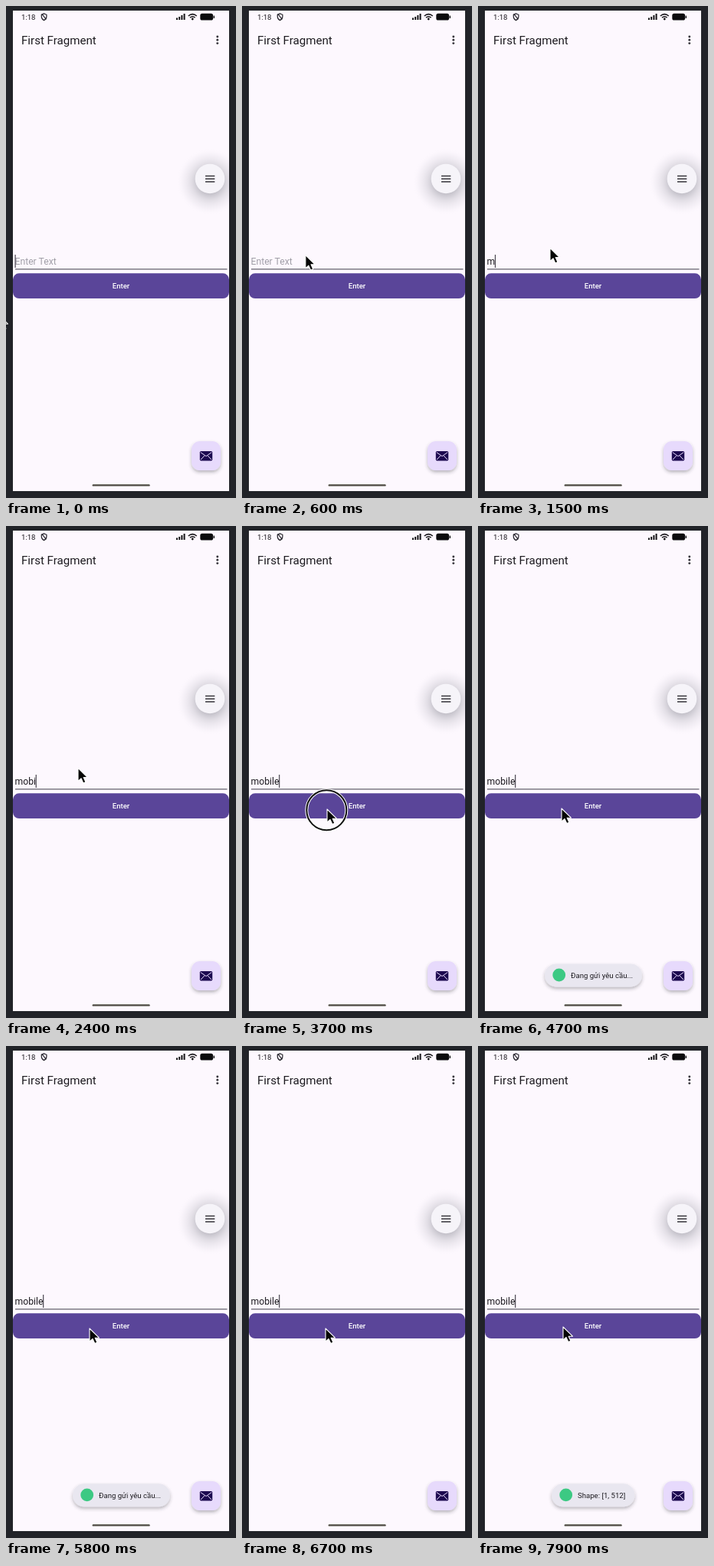
Write an HTML page that moves like this. It is 300 px wide and 641 px high and loops after 8000 ms.

```html
<!DOCTYPE html>
<html lang="en">
<head>
<meta charset="utf-8">
<title>First Fragment</title>
<style>
  html, body { margin: 0; width: 100%; height: 100%; overflow: hidden; background: #212328; }
  svg { display: block; width: 100vw; height: 100vh; }
  text { font-family: Roboto, sans-serif; fill: #1d1b20; }
</style>
</head>
<body>
<svg viewBox="0 0 300 641" preserveAspectRatio="none">
  <defs>
    <radialGradient id="glow">
      <stop offset=".35" stop-color="#b9b7c0" stop-opacity=".85"/>
      <stop offset=".55" stop-color="#d3d0d8" stop-opacity=".65"/>
      <stop offset=".8" stop-color="#e8e4ec" stop-opacity=".35"/>
      <stop offset="1" stop-color="#fdf8fe" stop-opacity="0"/>
    </radialGradient>
    <filter id="soft" x="-40%" y="-40%" width="180%" height="190%">
      <feDropShadow dx="0" dy="2.5" stdDeviation="2.3" flood-color="#34323c" flood-opacity=".34"/>
    </filter>
    <clipPath id="screen"><rect x="9" y="6" width="282" height="626"/></clipPath>
  </defs>

  <rect width="300" height="641" fill="#212328"/>
  <g clip-path="url(#screen)">
    <rect x="9" y="6" width="282" height="626" fill="#fdf8fe"/>

    <!-- status bar -->
    <text x="20" y="17.5" font-size="9.6">1:18</text>
    <g fill="none" stroke="#24222a" stroke-width="1.2">
      <path d="M46.3 11.3 L49.5 10 L52.9 11.3 V14 Q52.8 17 49.5 18.6 Q46.4 17 46.3 14 Z"/>
      <path d="M46.8 10.4 L52.4 17.4"/>
    </g>
    <path d="M222 18v-2.5h2v2.5z M225.2 18v-4h2v4z M228.4 18v-6h2v6z M231.6 18v-8h2v8z" fill="#151417"/>
    <g fill="none" stroke="#151417" stroke-width="1.5">
      <path d="M237.8 13 Q243.3 8.3 248.8 13"/>
      <path d="M240 15.2 Q243.3 12.5 246.6 15.2"/>
    </g>
    <circle cx="243.3" cy="17" r="1.4" fill="#151417"/>
    <rect x="253.3" y="9.8" width="16.8" height="8.8" rx="2.6" fill="#0c0c0e"/>
    <rect x="270.6" y="12.4" width="1.4" height="3.6" rx=".6" fill="#0c0c0e"/>

    <!-- app bar -->
    <text x="20" y="50.3" font-size="15.1">First Fragment</text>
    <g fill="#36343b">
      <circle cx="275.8" cy="40" r="1.45"/>
      <circle cx="275.8" cy="44.3" r="1.45"/>
      <circle cx="275.8" cy="48.6" r="1.45"/>
    </g>

    <!-- floating menu -->
    <circle cx="266" cy="229" r="44" fill="url(#glow)"/>
    <circle cx="266" cy="225" r="19.3" fill="#f6f4f9"/>
    <path d="M260 221.5h12.3 M260 225.3h12.3 M260 229.1h12.3" stroke="#36343b" stroke-width="1.5"/>

    <!-- input and button -->
    <text id="field" x="11.5" y="337.4" font-size="12.2"></text>
    <rect id="caret" y="324" width="1.2" height="17" fill="#49454f"/>
    <path d="M12 342.8H288.5" stroke="#65626d" stroke-width="1.3"/>
    <rect x="9" y="348.3" width="282" height="32.7" rx="8" fill="#5a4599"/>
    <text x="150" y="368.4" font-size="9.6" font-weight="500" text-anchor="middle" style="fill:#fff">Enter</text>

    <!-- mail button -->
    <rect x="242" y="567" width="38" height="38" rx="11" fill="#e7dafc" filter="url(#soft)"/>
    <rect x="252.8" y="580" width="16.4" height="12.4" rx="1.6" fill="#1d0a50"/>
    <path d="M253.8 581.5 L261 586.6 L268.2 581.5 M254 591 L258.8 586 M268 591 L263.2 586" fill="none" stroke="#e7dafc" stroke-width="1"/>

    <path d="M113.8 624.4H186.5" stroke="#4c4a40" stroke-width="2.4" stroke-linecap="round"/>

    <g id="toasts"></g>
  </g>

  <g id="ring" fill="none">
    <circle r="26" stroke="#fff" stroke-width="4"/>
    <circle r="26" stroke="#111" stroke-width="2"/>
  </g>
  <path id="pointer" d="M0 0 V17.2 L4 13.5 L6.8 19.6 L9.9 18.2 L7.2 12.2 H12.4 Z" fill="#060606" stroke="#fff" stroke-width="1.1" stroke-linejoin="round"/>
</svg>
<script>
const LOOP = 8000;
const $ = id => document.getElementById(id);
const clamp = v => Math.min(1, Math.max(0, v));
const progress = (t, start, end) => clamp((t - start) / (end - start));
const easeOut = p => 1 - (1 - p) ** 3;

const word = "mobile";
const keyTimes = [1500, 1800, 2050, 2300, 2450, 2700];

// Pointer moves: start, end, destination
const origin = [-10, 402];
const moves = [
  [50, 1100, 94, 315.3],
  [3000, 3600, 111, 369],
  [4100, 4500, 109, 368],
  [7300, 7900, 111, 366]
];

const toasts = [
  { x: 87, width: 127, text: "Đang gửi yêu cầu...", show: 4300, hide: 6400 },
  { x: 96, width: 108.5, text: "Shape: [1, 512]", show: 6700, hide: 9000 }
];

$("toasts").innerHTML = toasts.map(({ x, width, text }) => `<g>
  <rect x="${x}" y="570.3" width="${width}" height="30" rx="15" fill="#e9e7f0" filter="url(#soft)"/>
  <circle cx="${x + 18.7}" cy="584.9" r="8.4" fill="#3cc983"/>
  <text x="${x + 34}" y="588.5" font-size="9.6">${text}</text>
</g>`).join("");

function pointerAt(t) {
  let [x, y] = origin;
  for (const [start, end, toX, toY] of moves) {
    const p = easeOut(progress(t, start, end));
    x += (toX - x) * p;
    y += (toY - y) * p;
  }
  return [x, y];
}

function caretVisible(t) {
  if (t < 1500) return t % 1000 < 500;
  if (t < 2700) return true;
  return (t - 2700) % 1000 < 500;
}

function drawToast({ x, width, show, hide }, node, t) {
  const entered = easeOut(progress(t, show, show + 500));
  const leaving = progress(t, hide, hide + 250);
  const scale = 0.9 + 0.1 * entered - 0.1 * leaving;
  const cx = x + width / 2, cy = 585.3;
  node.style.opacity = progress(t, show + 50, show + 150) * (1 - progress(t, hide + 100, hide + 250));
  node.setAttribute("transform",
    `translate(${cx} ${cy + 12 * (1 - entered)}) scale(${scale}) translate(${-cx} ${-cy})`);
}

function draw(t) {
  const field = $("field");
  const typed = word.slice(0, keyTimes.filter(k => t >= k).length);
  field.textContent = typed || "Enter Text";
  field.style.fill = typed ? "#1d1b20" : "#a19fa8";
  $("caret").setAttribute("x", typed ? 11.2 + field.getComputedTextLength() : 11.5);
  $("caret").style.opacity = caretVisible(t) ? 1 : 0;

  const [x, y] = pointerAt(t);
  $("pointer").setAttribute("transform", `translate(${x} ${y})`);
  $("ring").setAttribute("transform", `translate(${x - 0.7} ${y + 1.2})`);
  $("ring").style.opacity = progress(t, 3570, 3650) * (1 - progress(t, 3820, 4020));

  toasts.forEach((toast, i) => drawToast(toast, $("toasts").children[i], t));
}

const began = performance.now();
function tick() {
  draw((performance.now() - began) % LOOP);
  requestAnimationFrame(tick);
}
tick();
</script>
</body>
</html>
```
